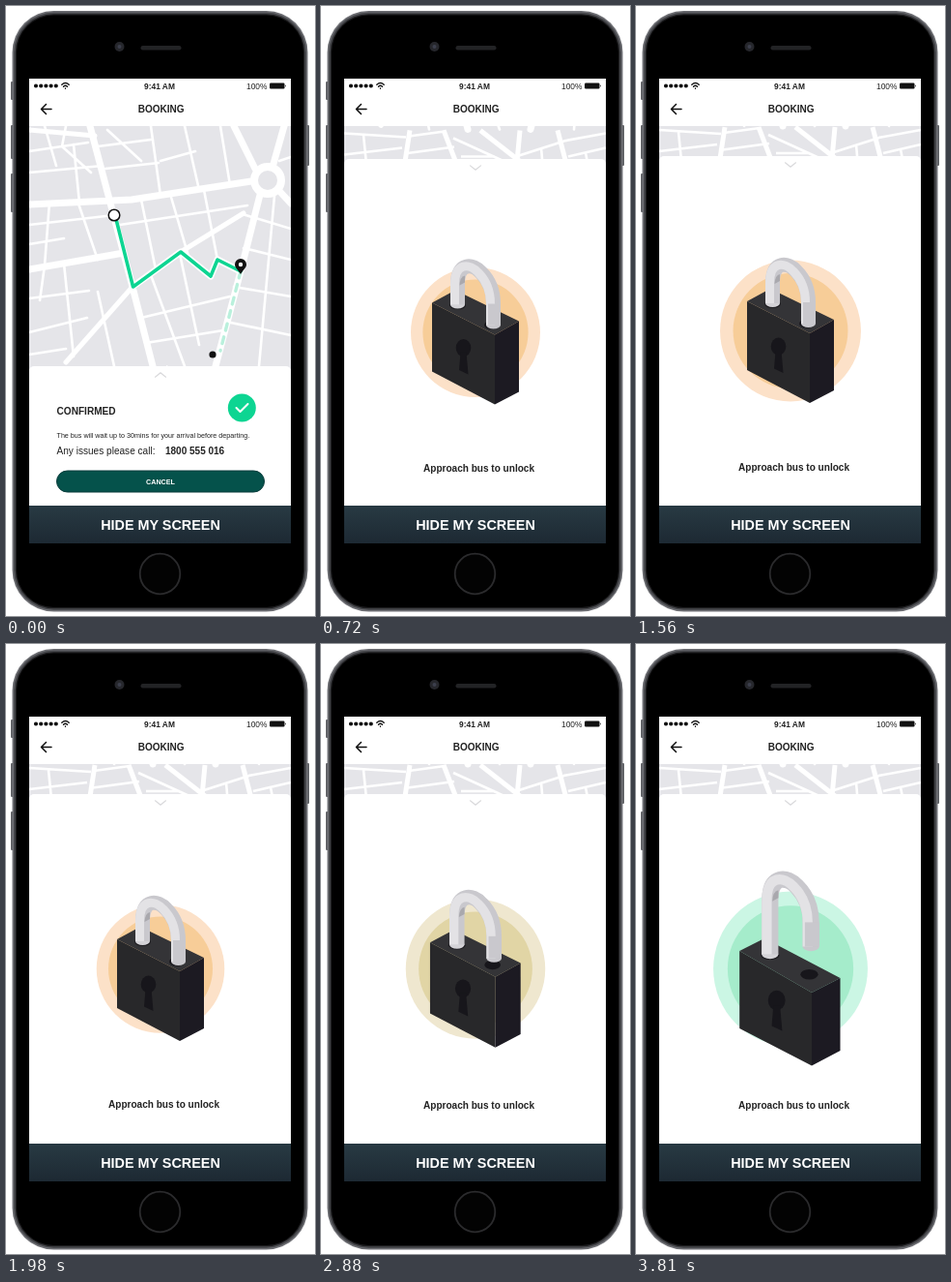
Recreate the animation shown at these times as an HTML page. Size 320 by 630 pixels, loop 3.84 s.

```html
<!DOCTYPE html>
<html lang="en">
<head>
<meta charset="utf-8">
<title>Booking unlock</title>
<style>
  html, body { margin: 0; width: 100%; height: 100%; overflow: hidden; background: #fff; }
  svg { display: block; width: 100%; height: 100%; }
  text { font-family: "Liberation Sans", Arial, sans-serif; fill: #222; }
  .b { font-weight: 700; }
  .mid { text-anchor: middle; }
  .line { fill: none; stroke-linecap: round; stroke-linejoin: round; }
</style>
</head>
<body>
<svg viewBox="0 0 320 630">
  <defs>
    <linearGradient id="bar" x1="0" x2="0" y1="0" y2="1">
      <stop offset="0" stop-color="#283a43"/>
      <stop offset="1" stop-color="#1d2933"/>
    </linearGradient>
    <clipPath id="view"><rect x="24" y="124" width="271" height="392"/></clipPath>
  </defs>

  <!-- phone -->
  <g fill="#5f6065">
    <rect x="5" y="78" width="4" height="19" rx="1"/>
    <rect x="5" y="123" width="4" height="35" rx="1"/>
    <rect x="5" y="173" width="4" height="40" rx="1"/>
    <rect x="310" y="123" width="4" height="42" rx="1"/>
  </g>
  <rect x="6.500" y="5" width="306" height="620.500" rx="43" fill="#6e6f74"/>
  <rect x="8" y="6.500" width="303" height="617.500" rx="41.500" fill="#47484c"/>
  <rect x="9.800" y="8.300" width="299.400" height="613.900" rx="39.700" fill="#1c1c1e"/>
  <rect x="11" y="9.500" width="297" height="611.500" rx="38.500" fill="#000"/>
  <circle cx="117.500" cy="42" r="5" fill="#26272c"/>
  <circle cx="117.500" cy="42" r="2" fill="#3c3f4c"/>
  <rect x="139.500" y="41" width="42" height="4.500" rx="2.200" fill="#222325"/>
  <circle cx="159.500" cy="586.500" r="20.800" fill="#030303" stroke="#2b2b2d" stroke-width="1.800"/>

  <!-- header -->
  <rect x="24" y="75" width="271" height="480" fill="#fff"/>
  <path class="line" d="M31 82.500H52" stroke="#111" stroke-width="4.200" stroke-dasharray="0 5.200"/>
  <g class="line" stroke="#111" stroke-width="1.400">
    <path d="M57.800 81.200Q61.500 77.800 65.200 81.200M59.500 83.200Q61.500 81.500 63.500 83.200"/>
    <path d="M61.500 85V85.200"/>
  </g>
  <text class="b mid" x="159" y="85.500" font-size="8.400">9:41 AM</text>
  <text x="249" y="85.500" font-size="8.400">100%</text>
  <rect x="273" y="79.500" width="15.500" height="6" rx="1.200" fill="#111"/>
  <path d="M289 81.200Q290.600 82.500 289 83.800Z" fill="#111"/>
  <path class="line" d="M47 106.500H36.800M41.500 101.500L36.500 106.500L41.500 111.500" stroke="#111" stroke-width="1.500"/>
  <text class="b mid" x="160.600" y="109.500" font-size="10">BOOKING</text>

  <g clip-path="url(#view)">
    <rect x="24" y="124" width="271" height="392" fill="#e5e5e9"/>
    <g id="map">
      <g class="line" stroke="#fff">
        <path stroke-width="2.600" d="M24 150L85 141M40 124L52 165M62 124L58 145L88 172M24 172L100 165M70 143L76 203
          M24 226L112 216M45 203L40 268M75 204L95 262M24 246L60 240M60 266L70 362M24 302L86 294M24 337L84 322
          M40 268L35 304M95 295L112 372M105 128L140 160M150 124L160 196M185 124L200 190M95 145L150 138M103 168L158 162"/>
        <path stroke-width="2.600" d="M118 226L250 206M140 200L155 272M170 194L190 262M205 190L219 262M150 278L185 372
          M180 256L200 350M140 322L232 300M145 348L225 335M245 215L295 230M246 250L295 262M236 290L295 300
          M228 326L295 340M278 196L262 372M222 124L232 185M24 360L62 354M160 160L196 150M283 160L295 156"/>
        <path stroke-width="7" d="M87 124L131 290L152 372M24 205L130 200L254 181M24 272L122 255M131 290L181 254L212 279L219 262L243 274
          M258 168L236 124M277 163L288 124M263 195L243 274L217 372M284 192L295 204"/>
        <path stroke-width="5" d="M24 128L92 134M181 254L246 214M131 290L62 368"/>
      </g>
      <circle cx="271" cy="180" r="14" fill="#e5e5e9" stroke="#fff" stroke-width="8"/>
      <g fill="none" stroke="#fff" transform="translate(0 248)">
        <path stroke-width="2.600" d="M24 128L88 132M24 150L84 143M44 130L50 190M91 131L128 126M86 149L138 142
          M137 133L192 158M145 152L180 152M205 151L252 136M228 143L232 190M251 136L295 128M256 152L295 143M274 148L282 190"/>
        <path stroke-width="5" d="M92 125L82 190M127 125L152 190M165 125L210 160M206 125L200 190M245 125L262 190"/>
      </g>
      <path class="line" d="M243 274L222 356" stroke="#b9f0dc" stroke-width="3.400" stroke-dasharray="7 7"/>
      <path class="line" d="M113.200 217L131.600 290L181 254L212 279L219 262L243 274" stroke="#0dd592" stroke-width="3.600" stroke-linejoin="miter"/>
      <circle cx="112" cy="216" r="5.800" fill="#fff" stroke="#111" stroke-width="1.500"/>
      <circle cx="214" cy="360" r="3.600" fill="#111"/>
      <path d="M243 277C240 272 237 270 237 267A6 6 0 0 1 249 267C249 270 246 272 243 277Z" fill="#111"/>
      <circle cx="243" cy="267" r="2.200" fill="#fff"/>
    </g>

    <rect id="sheet" x="24" width="271" height="440" rx="5" fill="#fff"/>
    <path id="chevron" class="line" stroke="#d9d9db" stroke-width="1.200"/>

    <g id="details">
      <text class="b" x="52.500" y="421.500" font-size="10.100">CONFIRMED</text>
      <circle cx="244.300" cy="415" r="14.500" fill="#0dd592"/>
      <path class="line" d="M238.500 415L242.500 419L250.500 411" stroke="#fff" stroke-width="2"/>
      <text x="52.500" y="446" font-size="7.180">The bus will wait up to 30mins for your arrival before departing.</text>
      <text x="52.500" y="463" font-size="10.080">Any issues please call:</text>
      <text class="b" x="165" y="463" font-size="10">1800 555 016</text>
      <rect x="52.500" y="480" width="215" height="22" rx="11" fill="#05524b" stroke="#0a3d3c"/>
      <text class="b mid" x="160" y="494" font-size="7.200" style="fill:#fff">CANCEL</text>
    </g>

    <g id="content">
      <g id="rings">
        <circle id="outer" cx="160" cy="335.500"/>
        <circle id="inner" cx="160" cy="335.500"/>
      </g>
      <g id="lock">
        <path id="lid" fill="#343437"/>
        <path id="face" fill="#28282a"/>
        <path id="side" fill="#1c1a22"/>
        <g id="fittings">
          <ellipse cx="147.500" cy="351.500" rx="7.800" ry="9" fill="#17161b"/>
          <path d="M144.500 356H150.500L152.500 379L143 374.500Z" fill="#17161b"/>
          <ellipse cx="177" cy="328" rx="8" ry="4.600" fill="#17161b"/>
          <g id="shackle"></g>
        </g>
      </g>
      <text id="hint" class="b mid" x="163.500" y="479.500" font-size="10.050">Approach bus to unlock</text>
    </g>
  </g>

  <rect x="24" y="516" width="271" height="39" fill="url(#bar)"/>
  <text class="b mid" x="160" y="541" font-size="14.400" style="fill:#fff">HIDE MY SCREEN</text>
</svg>
<script>
const LOOP = 3840, LOW = 372, HIGH = 155;
const $ = id => document.getElementById(id);
const set = (id, attrs) => {
  for (const k in attrs) $(id).setAttribute(k, attrs[k]);
};
const mix = (a, b, k) => a + (b - a) * k;
const mixAll = (a, b, k) => a.map((v, i) => mix(v, b[i], k));
const ramp = (t, a, b) => Math.min(1, Math.max(0, (t - a) / (b - a)));
const smooth = k => k * k * (3 - 2 * k);
const blend = (a, b, k) => `rgb(${mixAll(a, b, k).map(Math.round)})`;

// Underdamped spring from 0 to 1, peaking after about 360 ms
function spring(ms) {
  const t = Math.max(0, ms) / 1000, decay = 5.9, w = 8.7;
  return 1 - Math.exp(-decay * t) * (Math.cos(w * t) + decay / w * Math.sin(w * t));
}

// Each corner of the lock body: closed, then open
const corners = {
  left: [[115, 305], [107.2, 317]],
  back: [[139, 292], [133, 304]],
  right: [[205, 324], [211.5, 345]],
  front: [[180, 338], [182, 360]],
  leftBase: [[115, 376], [107.2, 397]],
  frontBase: [[180, 410], [182, 435.5]],
  rightBase: [[205, 397], [211.5, 420]]
};

function drawBody(open) {
  const shape = (id, names) => set(id, {
    d: "M" + names.split(" ").map(n => mixAll(...corners[n], open)).join("L") + "Z"
  });
  shape("lid", "left back right front");
  shape("face", "left front frontBase leftBase");
  shape("side", "front right rightBase frontBase");
}

function shackle(open) {
  const foot = 307 + 3 * open;
  const y = v => v - 25 * open;
  const tube = dx => `M${141.5 + dx} ${foot}V${y(286)}` +
    `C${141.5 + dx} ${y(263)} ${157 + dx} ${y(264)} ${166 + dx} ${y(274)}` +
    `C${175 + dx} ${y(283)} ${178.5 + dx} ${y(294)} ${178.5 + dx} ${y(306)}V${y(328)}`;
  const disc = (x, v, fill, r = 7.5) => `<ellipse cx="${x}" cy="${v}" rx="${r}" ry="4" fill="${fill}"/>`;
  const stroke = (d, color, width) => `<path d="${d}" fill="none" stroke="${color}" stroke-width="${width}"/>`;
  return disc(141.5, foot + 0.8, "#1d1c20", 8.5) +
    disc(141.5, foot, "#d4d3d7") + disc(178.5, y(328), "#c9c8cd") +
    stroke(tube(0), "#c9c8cd", 15) + stroke(tube(-3), "#e3e2e5", 9) +
    stroke(`M179.5 ${y(306)}V${y(328)}`, "#c9c8cd", 13) +
    `<path d="M143.500 ${y(287)}Q144 ${y(278)} 149 ${y(277)}V${y(284)}Z" fill="#a9a8ad"/>`;
}

function draw(t) {
  const p = spring(t - 10);
  const top = mix(LOW, HIGH, p);
  const fade = ramp(t, 90, 440);
  const open = smooth(ramp(t, 2780, 3080));

  set("map", { transform: `translate(0 ${-248 * p})` });
  set("sheet", { y: top });
  const bend = mix(-2.2, 2.2, Math.min(1, p));
  set("chevron", { d: `M154.500 ${top + 9 - bend}L160 ${top + 9 + bend}L165.500 ${top + 9 - bend}` });
  set("details", { transform: `translate(0 ${(top - LOW) / 2})`, opacity: 1 - ramp(t, 10, 180) });
  set("content", { transform: `translate(0 ${(top - HIGH) / 2})` });
  for (const id of ["rings", "lock", "hint"]) set(id, { opacity: fade });

  const r = 72.8 + 7.2 * Math.cos(2 * Math.PI * (t - 1240) / 1300);
  set("outer", { r, fill: blend([252, 225, 200], [203, 246, 228], open) });
  set("inner", { r: r * 0.815, fill: blend([247, 205, 152], [165, 236, 203], open) });

  drawBody(open);
  set("fittings", { transform: `translate(160 ${410 + 25 * open}) scale(${1 + 0.144 * open}) translate(-160 -410)` });
  $("shackle").innerHTML = shackle(open);
}

const start = performance.now();
function tick() {
  draw((performance.now() - start) % LOOP);
  requestAnimationFrame(tick);
}
draw(0);
requestAnimationFrame(tick);
</script>
</body>
</html>
```
